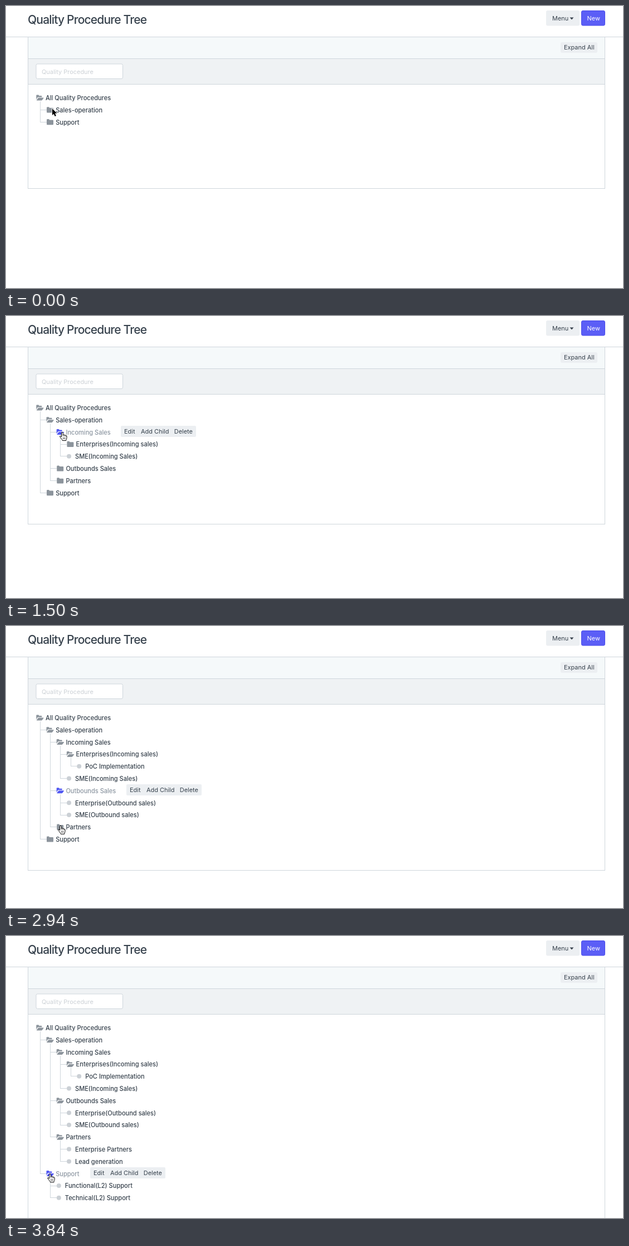
Recreate the animation shown at these times as an HTML page. Size 1107x506 px, loop 3.96 s.

```html
<!DOCTYPE html>
<html lang="en">
<head>
<meta charset="utf-8">
<title>Quality Procedure Tree</title>
<style>
  html, body { margin: 0; width: 100%; height: 100%; overflow: hidden; background: #fff; }
  svg { display: block; width: 1107px; height: 506px; }
  text { font: 400 10.95px Inter, sans-serif; fill: #36414c; white-space: pre; }
  .title { font-size: 21px; font-weight: 500; letter-spacing: -0.81px; }
  .label { font-size: 11.04px; font-weight: 500; }
  .line { fill: #cfd6dc; shape-rendering: crispEdges; }
  .icon { fill: #8c949c; }
  .dot { fill: #cbd0d5; }
  .chip { fill: #eceff2; }
  .on.icon { fill: #5158f2; }
  .on.label { fill: #8d97a2; }
</style>
</head>
<body>
<svg viewBox="0 0 1107 506">
  <rect x="39" y="56" width="1036" height="38" fill="#f5f9fa"/>
  <rect x="39" y="94" width="1036" height="47" fill="#eff2f4"/>
  <g class="line">
    <rect x="0" y="55" width="1107" height="1"/>
    <rect x="39" y="94" width="1036" height="1"/>
    <rect x="39" y="140" width="1036" height="1"/>
    <rect class="side" x="39" y="56" width="1"/>
    <rect class="side" x="1074" y="56" width="1"/>
    <rect id="base" x="39" width="1036" height="1"/>
  </g>
  <text class="title" x="39" y="32">Quality Procedure Tree</text>
  <rect class="chip" x="969" y="8" width="60" height="27.5" rx="3"/>
  <text x="980" y="25.5">Menu</text>
  <path d="M1011.5 20.5h7l-3.5 4z" fill="#36414c"/>
  <rect x="1032.5" y="8.5" width="42" height="26.5" rx="2.5" fill="#5b5ef6" stroke="#4a4cea"/>
  <text x="1042.5" y="25.5" style="fill:#fff">New</text>
  <rect class="chip" x="995" y="65" width="66" height="19" rx="3"/>
  <text x="1001" y="78">Expand All</text>
  <rect x="54" y="104" width="155.5" height="26.5" rx="2.5" fill="#fff" stroke="#cfd6dc"/>
  <text x="64" y="122" style="fill:#ccd1d6">Quality Procedure</text>
  <g id="tree"></g>
  <g id="arrow">
    <path d="M0 0v11.6l2.7-2.5 2 4.6 2.2-1-2-4.4h3.7z" stroke="#fff" stroke-width="1.6" paint-order="stroke"/>
  </g>
  <g id="hand" stroke="#000" stroke-linejoin="round" stroke-linecap="round">
    <path d="M4.5 8.5V2q0-1.5 1.4-1.5 1.3 0 1.3 1.5v3.8q.3-.8 1.3-.8 1.1 0 1.3 1 .4-.5 1.2-.4 1 .1 1.1 1.1.4-.3.9-.2 1 .2 1 1.5v2.5q0 1.5-.8 2.8-.4.8-.4 2.2H6.2q0-1-.9-2L2.7 9.9Q.8 8.4 1.6 7.6 2.6 7 4.5 8.5z" fill="#fff"/>
    <path d="M7.2 5.8v2M9.8 6v2M12.1 6.7v1.6M7.4 10.2v2.6M9.2 10.2v2.6M11 10.2v2.6" fill="none" stroke-width=".6"/>
  </g>
</svg>
<script>
const LOOP = 3960, TICK = 60, ROW = 21.8, INDENT = 18.2;
const OPEN = "M-6.5 3.4V-4q0-1 1-1h2.8q1 0 1 1v.5h4.2q1 0 1 1v1.4h-6q-1.2 0-2 .9z" +
  "M-5.8 4.3l2.5-3.5q.6-.8 1.6-.8h8q.9 0 .4.8L4.2 4.2q-.6.8-1.6.8h-8q-.9 0-.4-.7z";
const CLOSED = "M-6 3.9V-3.9q0-1.2 1.2-1.2h2.4q1.2 0 1.2 1.2v.3h6q1.2 0 1.2 1.2v6.3q0 1.2-1.2 1.2h-9.6q-1.2 0-1.2-1.2z";

const leaf = label => ({ label });
const folder = (label, at, bar, ...kids) => ({ label, at, bar, kids });

// Folders carry the moment they open and the x of their button bar.
const root = folder("All Quality Procedures", -1, 0,
  folder("Sales-operation", 840, 192,
    folder("Incoming Sales", 1380, 206,
      folder("Enterprises(Incoming sales)", 2040, 291, leaf("PoC Implementation")),
      leaf("SME(Incoming Sales)")),
    folder("Outbounds Sales", 2580, 216,
      leaf("Enterprise(Outbound sales)"), leaf("SME(Outbound sales)")),
    folder("Partners", 3120, 171,
      leaf("Enterprise Partners"), leaf("Lead generation"))),
  folder("Support", 3720, 151,
    leaf("Functional(L2) Support"), leaf("Technical(L2) Support")));

// Pointer moves: start, end, x, y
const moves = [
  [240, 240, 73.2, 184.8],
  [360, 480, 82.8, 195],
  [1140, 1320, 95, 208],
  [1560, 1800, 109, 230],
  [2100, 2400, 91.2, 291],
  [2640, 2940, 92, 357.8],
  [3180, 3600, 73.2, 426.3]
];

const $ = id => document.getElementById(id);
const ease = p => p * p * (3 - 2 * p);
const line = (x, y, w, h) => `<rect class="line" x="${x}" y="${y}" width="${w}" height="${h}"/>`;
const text = (x, y, s, cls = "") => `<text class="${cls}" x="${x}" y="${y}">${s}</text>`;

function buttons(x, y) {
  return `<rect class="chip" x="${x}" y="${y - 11.7}" width="135" height="20" rx="2"/>` +
    text(x + 6, y + 2.4, "Edit") + text(x + 36, y + 2.4, "Add Child") + text(x + 95.8, y + 2.4, "Delete");
}

function lastOpened(node, t) {
  return (node.kids || []).map(k => lastOpened(k, t))
    .reduce((a, b) => b.at > a.at ? b : a, node.at <= t ? node : { at: -2 });
}

function drawTree(t) {
  const chosen = lastOpened(root, t);
  let row = 0, back = "", front = "";

  function visit(node, level) {
    const y = 165 + ROW * row++, mid = 61 + INDENT * level;
    const on = node === chosen && node !== root;
    const mark = on ? " on" : "";
    if (!node.kids) {
      front += `<circle class="dot" cx="${mid - 2.6}" cy="${y - .4}" r="4"/>`;
      front += text(mid + 8.4, y + 4, node.label, "label");
      return y;
    }
    const open = node.at <= t;
    front += `<path class="icon${mark}" transform="translate(${mid - .2} ${y - .5})" d="${open ? OPEN : CLOSED}"/>`;
    front += text(mid + 10, y + 4, node.label, "label" + mark);
    if (on) front += buttons(node.bar, y);
    if (open) {
      const x = Math.round(mid), top = Math.round(y + 6);
      let end;
      for (const kid of node.kids) {
        end = Math.round(visit(kid, level + 1) - .8);
        back += line(x, end, 12, 1);
      }
      back += line(x, top, 1, end - top + 1);
    }
    return y;
  }

  visit(root, 0);
  $("tree").innerHTML = back + front;
  const base = Math.max(327, Math.round(165 + ROW * (row - 1) + 55));
  $("base").setAttribute("y", base);
  document.querySelectorAll(".side").forEach(s => s.setAttribute("height", base - 56));
}

function drawPointer(t) {
  const hand = t >= 240;
  $("arrow").style.display = hand ? "none" : "";
  $("hand").style.display = hand ? "" : "none";
  $("arrow").setAttribute("transform", `translate(${t < 60 ? 83 : 80.5} 184.3)`);
  let [, , x, y] = moves[0];
  for (const [from, to, nx, ny] of moves.slice(1)) {
    const p = ease(Math.min(1, Math.max(0, (t - from) / (to - from))));
    x += (nx - x) * p;
    y += (ny - y) * p;
  }
  $("hand").setAttribute("transform", `translate(${x} ${y})`);
}

let shown = -1;
function frame(now) {
  const t = Math.floor(now % LOOP / TICK) * TICK;
  if (t !== shown) {
    drawTree(t);
    drawPointer(t);
    shown = t;
  }
  requestAnimationFrame(() => frame(performance.now()));
}
frame(0);
</script>
</body>
</html>
```
